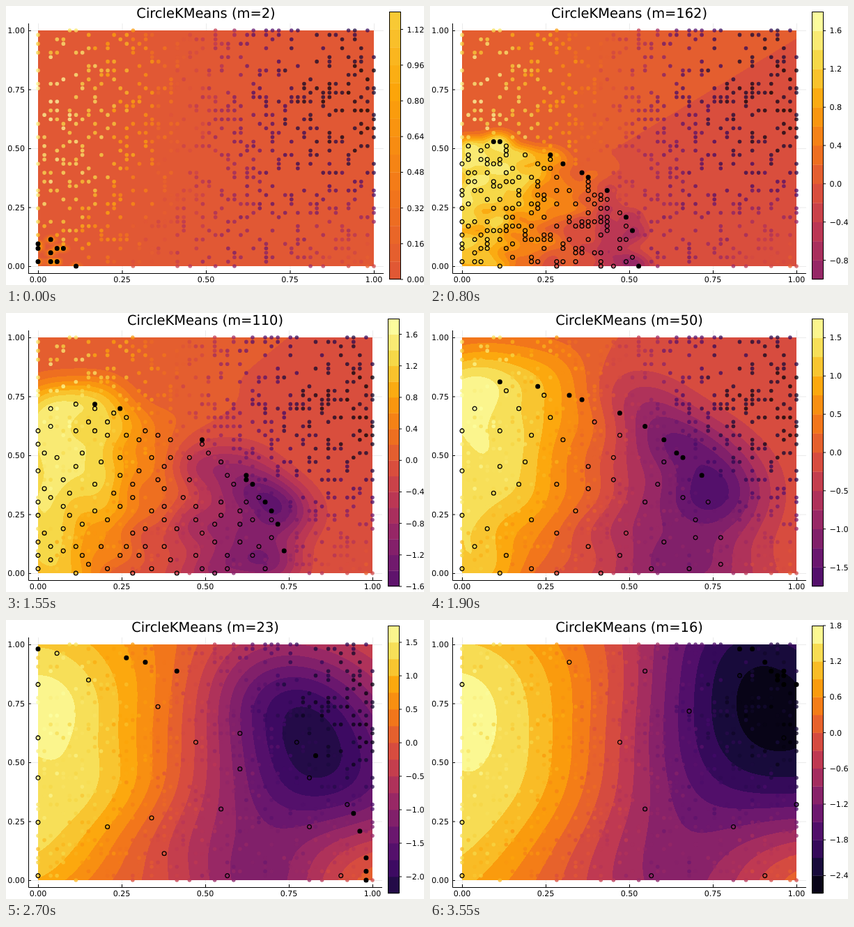
An HTML page with a canvas that plays this animation: 600 by 400 pixels, repeating every 3.6 s.

```html
<!DOCTYPE html>
<html lang="en">
<head>
<meta charset="utf-8">
<title>CircleKMeans</title>
<style>
  html, body { margin: 0; width: 600px; height: 400px; overflow: hidden; background: #fff; }
  canvas, svg { position: absolute; }
  canvas { left: 46px; top: 35px; height: 338px; }
  svg { left: 0; top: 0; font-family: "DejaVu Sans", sans-serif; font-size: 11.11px;
    text-rendering: geometricPrecision; }
</style>
</head>
<body>
<canvas id="surface" width="480" height="338"></canvas>
<svg id="stage" width="600" height="400" viewBox="0 0 600 400">
  <g id="plot">
    <path id="grid" stroke="#000" stroke-opacity=".08" fill="none"/>
    <g id="dots" fill-opacity=".75"></g>
    <path id="centers" fill="none" stroke="#000" stroke-width="1.3"/>
    <path id="batch" fill="#000"/>
    <path id="axes" fill="none" stroke="#000"/>
  </g>
  <g id="labels"></g>
  <text id="title" y="17" text-anchor="middle" font-size="19.44"></text>
  <g id="bar"></g>
</svg>
<script>
const STEP = 50, FRAMES = 72, N = 54, PER = 10, W = 480, H = 338;
const $ = id => document.getElementById(id);

function add(parent, tag, attrs, text) {
  const el = document.createElementNS("http://www.w3.org/2000/svg", tag);
  for (const k in attrs) el.setAttribute(k, attrs[k]);
  if (text !== undefined) el.textContent = text;
  parent.appendChild(el);
  return el;
}

let seed = 20417;
function rand() {
  seed = (seed + 0x6D2B79F5) | 0;
  let t = Math.imul(seed ^ (seed >>> 15), 1 | seed);
  t = (t + Math.imul(t ^ (t >>> 7), 61 | t)) ^ t;
  return ((t ^ (t >>> 14)) >>> 0) / 4294967296;
}

// piecewise linear value from [frame, value] keys
function track(keys, k) {
  let i = 0;
  while (i < keys.length - 2 && k > keys[i + 1][0]) i++;
  const [a, u] = keys[i], [b, v] = keys[i + 1];
  return u + (v - u) * (k - a) / (b - a);
}

const LENGTH = [[0, .008], [8, .026], [23, .036], [38, .115], [48, .18], [61, .23], [71, .28]];
const COUNT = [[0, 2], [24, 242], [31, 110], [38, 50], [48, 28], [61, 17], [71, 16]];
const LOW = [[0, 0], [8, -.6], [23, -1.2], [38, -1.75], [48, -2.25], [61, -2.25], [66, -2.7], [71, -2.7]];
const HIGH = [[0, 1.2], [4, 1.75], [71, 1.75]];
const centerCount = k => Math.round(track(COUNT, k));

// colour levels: the finest round step that needs at most 16 bins
function levels(k) {
  const lo = track(LOW, k), hi = track(HIGH, k);
  const step = [.08, .1, .15, .2, .25, .3].find(s => (hi - lo) / s < 16.5);
  const first = Math.floor(lo / step + 1e-6), last = Math.ceil(hi / step - 1e-6);
  return { lo: first * step, hi: last * step, step, bins: last - first };
}

const INFERNO = ["000004", "160b39", "420a68", "6a176e", "932667", "bc3754",
  "dd513a", "f37819", "fca50a", "f6d746", "fcffa4"]
  .map(h => [0, 2, 4].map(i => parseInt(h.slice(i, i + 2), 16)));
function color(v) {
  const p = Math.max(0, Math.min(9.999, 6.1 + 2.25 * v)), i = Math.floor(p);
  return INFERNO[i].map((c, n) => Math.round(c + (INFERNO[i + 1][n] - c) * (p - i)));
}
const css = v => `rgb(${color(v)})`;

// underlying field: a wave in x, bent by four soft bumps
const bump = (dx, dy, sx, sy) => Math.exp(-dx * dx / sx - dy * dy / sy);
function field(x, y) {
  return -.45 + 2.05 * Math.cos(Math.PI * x)
    + 2.5 * bump(1 - x, y, .07, .1)
    - .75 * bump(x - .25, y, .1, .1)
    - .25 * bump(x - .75, y - .8, .06, .06)
    + .7 * (x - .45) * bump(0, 1 - y, 1, .03);
}

// samples: one of every four lattice cells, ordered by distance from the corner
const cells = Array.from({ length: N * N }, (_, c) =>
  ({ x: c % N / (N - 1), y: Math.floor(c / N) / (N - 1) }));
cells.sort((a, b) => Math.hypot(a.x, a.y) - Math.hypot(b.x, b.y));
const cloud = [];
for (let c = 0; c < cells.length; c += 4) {
  const { x, y } = cells[c + Math.floor(rand() * 4)];
  cloud.push({ x, y, v: field(x, y) + .5 * (rand() - .5) });
}
const batchAt = k => cloud.slice(PER * k, PER * (k + 1));

// drop one point of the closest pair until few enough are left
function prune(pts, max) {
  while (pts.length > max) {
    let best = Infinity, drop = 0;
    for (let i = 1; i < pts.length; i++)
      for (let j = 0; j < i; j++) {
        const d = (pts[i].x - pts[j].x) ** 2 + (pts[i].y - pts[j].y) ** 2;
        if (d < best) { best = d; drop = i; }
      }
    pts.splice(drop, 1);
  }
  return pts;
}
const centers = [[]];
for (let k = 1; k < FRAMES; k++)
  centers.push(prune(centers[k - 1].concat(batchAt(k - 1)), centerCount(k) - 2));

// Gaussian process weights by Cholesky factorisation
function fit(pts, len, noise) {
  const n = pts.length, L = [], w = [];
  for (let i = 0; i < n; i++) {
    L.push(new Float64Array(i + 1));
    let s = pts[i].v;
    for (let j = 0; j <= i; j++) {
      const dx = pts[i].x - pts[j].x, dy = pts[i].y - pts[j].y;
      let a = Math.exp(-(dx * dx + dy * dy) / (2 * len * len)) + (i === j ? noise : 0);
      for (let q = 0; q < j; q++) a -= L[i][q] * L[j][q];
      L[i][j] = i === j ? Math.sqrt(Math.max(a, 1e-9)) : a / L[j][j];
      if (j < i) s -= L[i][j] * w[j];
    }
    w.push(s / L[i][i]);
  }
  for (let i = n - 1; i >= 0; i--) {
    for (let j = i + 1; j < n; j++) w[i] -= L[j][i] * w[j];
    w[i] /= L[i][i];
  }
  return w;
}

// faint sign of the far tail, a wedge that opens upwards
function tail(k, x, y) {
  if (!k) return .02;
  const t = Math.max(0, Math.min(1, (k - 8) / 15));
  const low = y - .065 - .075 * t - (.53 + .62 * t) * x;
  const high = .98 + 1.5 * t - .68 * x * x - y;
  return .02 * Math.min(low, high);
}

// predicted surface on a grid of G by G cells
const G = 80, cache = [];
function surface(k) {
  if (cache[k]) return cache[k];
  const n = PER * (k + 1), stride = Math.ceil(n / 270), len = track(LENGTH, k);
  const pts = cloud.slice(0, n).filter((p, i) => i % stride === 0 || i >= n - PER);
  const w = fit(pts, len, .08);
  const out = new Float64Array((G + 1) ** 2);
  for (let j = 0; j <= G; j++)
    for (let i = 0; i <= G; i++) out[j * (G + 1) + i] = tail(k, i / G, j / G);
  const bell = d => Math.exp(-d * d / (2 * len * len));
  const kx = new Float64Array(G + 1);
  pts.forEach((p, q) => {
    for (let i = 0; i <= G; i++) kx[i] = bell(i / G - p.x);
    for (let j = 0; j <= G; j++) {
      const c = w[q] * bell(j / G - p.y), row = j * (G + 1);
      if (Math.abs(c) < 1e-9) continue;
      for (let i = 0; i <= G; i++) out[row + i] += c * kx[i];
    }
  });
  return cache[k] = out;
}

const canvas = $("surface"), ctx = canvas.getContext("2d"), img = ctx.createImageData(W, H);

function paint(k, { lo, step, bins }) {
  const f = surface(k), pal = [];
  for (let b = 0; b < bins; b++) pal.push(color(lo + (b + .5) * step));
  for (let py = 0, o = 0; py < H; py++) {
    const gy = (1 - (py + .5) / H) * G, j = Math.floor(gy), v = gy - j;
    for (let px = 0; px < W; px++, o += 4) {
      const gx = (px + .5) / W * G, i = Math.floor(gx), u = gx - i;
      const a = j * (G + 1) + i, b = a + G + 1;
      const z = (f[a] * (1 - u) + f[a + 1] * u) * (1 - v) + (f[b] * (1 - u) + f[b + 1] * u) * v;
      const c = pal[Math.max(0, Math.min(bins - 1, Math.floor((z - lo) / step)))];
      img.data[o] = c[0];
      img.data[o + 1] = c[1];
      img.data[o + 2] = c[2];
      img.data[o + 3] = 255;
    }
  }
  ctx.putImageData(img, 0, 0);
}

// static parts
const X = x => 46 + W * x, Y = y => 373 - H * y;
const ticks = [0, .25, .5, .75, 1];
$("grid").setAttribute("d", ticks.map(t =>
  `M${X(t) + .5} 25V35m0 338V383M32 ${Y(t) + .5}H46m480 0H540`).join(""));
$("axes").setAttribute("d", "M32.5 25V383.5H540" + ticks.map(t =>
  `M${X(t) + .5} 383v-4M32 ${Y(t) + .5}h4`).join(""));
for (const p of cloud) add($("dots"), "circle", { cx: X(p.x), cy: Y(p.y), r: 2.8, fill: css(p.v) });
const xLabels = ticks.map(t => {
  add($("labels"), "text", { x: 27, y: Y(t) + 4, "text-anchor": "end" }, t.toFixed(2));
  return add($("labels"), "text", { y: 396, "text-anchor": "middle" }, t.toFixed(2));
});

const rings = (pts, r) => pts.map(p =>
  `M${X(p.x) - r} ${Y(p.y)}a${r} ${r} 0 1 0 ${2 * r} 0a${r} ${r} 0 1 0 ${-2 * r} 0z`).join("");

function drawBar({ lo, hi, step, bins }) {
  const bar = $("bar"), px = 384 / (hi - lo), at = v => 392 - (v - lo) * px;
  bar.textContent = "";
  for (let b = 0; b < bins; b++) {
    const v = lo + b * step;
    add(bar, "rect", { x: 548, y: at(v + step), width: 16, height: step * px + .3,
      fill: css(v + step / 2) });
  }
  add(bar, "rect", { x: 548.5, y: 8.5, width: 16, height: 383, fill: "none", stroke: "#000" });
  const gap = 2 * step, digits = step < .1 ? 2 : 1;
  for (let i = Math.ceil(lo / gap - 1e-6); i * gap <= hi + 1e-6; i++) {
    add(bar, "path", { d: `M564 ${at(i * gap)}h4`, stroke: "#000" });
    add(bar, "text", { x: 573.5, y: at(i * gap) + 4 }, (i * gap).toFixed(digits).replace("-", "−"));
  }
}

// without minus signs the bar labels are narrower and the plot is wider
function layout(extra) {
  const s = (W + extra) / W;
  canvas.style.width = W + extra + "px";
  $("plot").setAttribute("transform", `translate(${46 - 46 * s} 0) scale(${s} 1)`);
  $("bar").setAttribute("transform", `translate(${extra} 0)`);
  $("title").setAttribute("x", 286 + extra / 2);
  xLabels.forEach((el, i) => el.setAttribute("x", 46 + (W + extra) * ticks[i]));
}

let shown = -1;
function draw(k) {
  if (k === shown) return;
  shown = k;
  const scale = levels(k);
  paint(k, scale);
  drawBar(scale);
  layout(scale.lo < 0 ? 0 : 2);
  $("centers").setAttribute("d", rings(centers[k], 2.9));
  $("batch").setAttribute("d", rings(batchAt(k), 3.5));
  $("title").textContent = `CircleKMeans (m=${centerCount(k)})`;
}

const start = performance.now();
function tick() {
  draw(Math.floor((performance.now() - start) / STEP) % FRAMES);
  requestAnimationFrame(tick);
}
tick();
</script>
</body>
</html>
```
